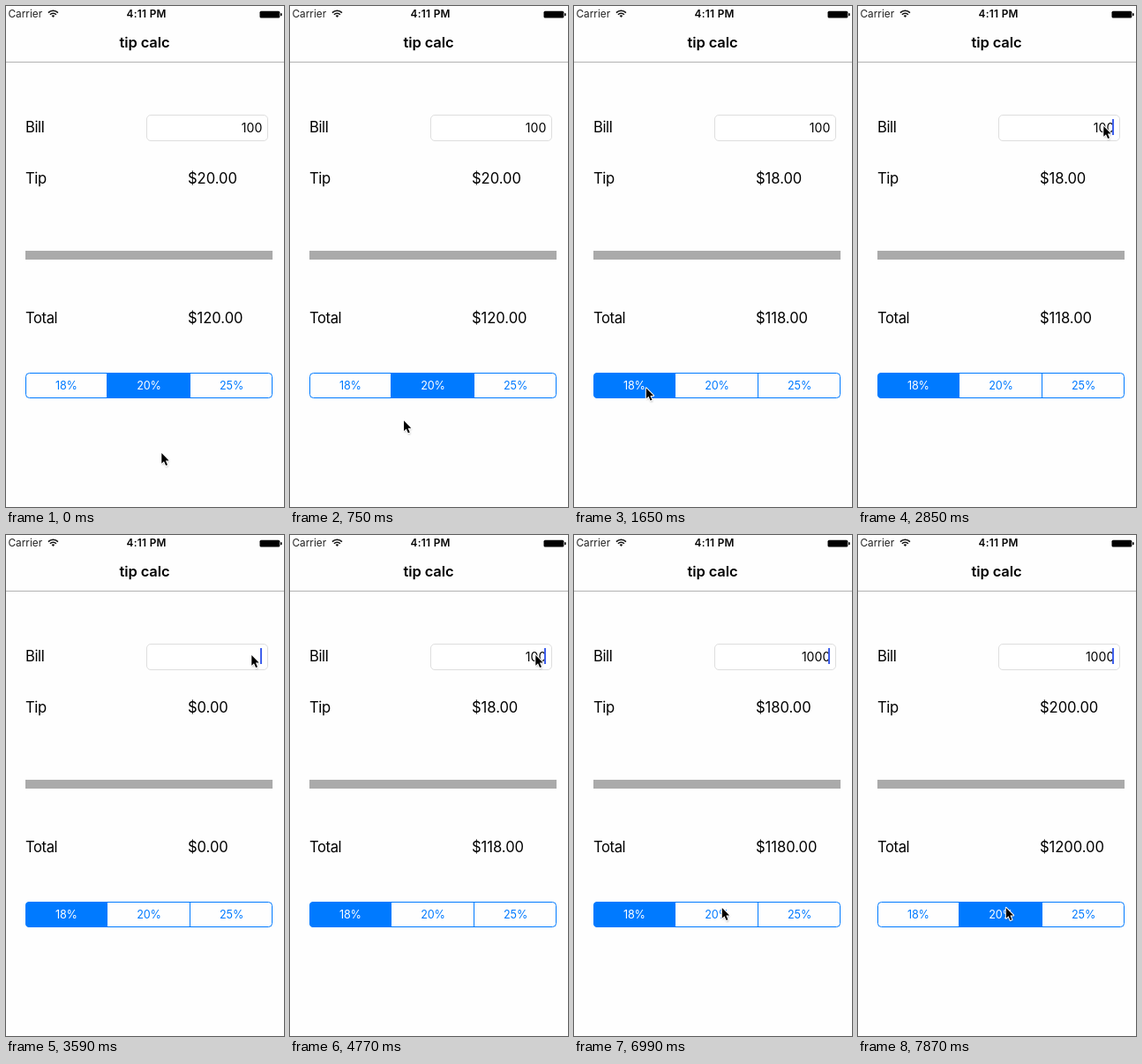
These frames come from a looping animation (315x567 px, 8000 ms). An HTML page:

```html
<!DOCTYPE html>
<html lang="en">
<head>
<meta charset="utf-8">
<title>tip calc</title>
<style>
  html, body { margin: 0; width: 100%; height: 100%; overflow: hidden; background: #fefefe; }
  svg { display: block; width: 315px; height: 567px; font-family: Inter, Roboto, sans-serif; }
  .label { font-size: 16.6px; letter-spacing: -.4px; }
  .amount { letter-spacing: -.05px; }
  .seg text { font-size: 12.6px; letter-spacing: -.15px; text-anchor: middle; fill: #007aff; }
  .seg rect { fill: transparent; }
  .seg.pressed rect { fill: #d9ebff; }
  .seg.on rect { fill: #007aff; }
  .seg.on text { fill: #fff; }
</style>
</head>
<body>
<svg viewBox="0 0 315 567">
  <defs>
    <clipPath id="round"><rect x="22" y="415" width="280" height="29" rx="4.5"/></clipPath>
    <filter id="soft" x="-50%" y="-50%" width="200%" height="200%"><feGaussianBlur stdDeviation=".9"/></filter>
    <path id="arrow" d="M.8 1.4V13.2L3.5 10.8L5.6 15.6L7.5 14.8L5.4 10H9.1Z"/>
  </defs>
  <rect width="315" height="567" fill="#fefefe"/>
  <rect y="63" width="315" height="1" fill="#b2b2b2"/>

  <text x="2.5" y="13.4" font-size="11.8" fill="#222">Carrier</text>
  <g fill="none" stroke="#111" stroke-width="1.6">
    <path d="M47.9 7.6a7.7 7.7 0 0 1 11 0M49.9 9.7a4.9 4.9 0 0 1 7 0"/>
    <path d="M51.6 11.1a2.5 2.5 0 0 1 3.6 0L53.4 13.1Z" fill="#111" stroke="none"/>
  </g>
  <text x="159.2" y="13.4" font-size="11.8" font-weight="600" letter-spacing=".3" text-anchor="middle">4:11 PM</text>
  <rect x="287.5" y="5.8" width="22.8" height="7.7" rx="1.5"/>
  <rect x="311" y="8" width="1.6" height="3.4" rx=".8"/>
  <text x="157" y="47" font-size="16.5" font-weight="600" letter-spacing="-.1" text-anchor="middle">tip calc</text>

  <g class="label">
    <text x="22" y="143.3">Bill</text>
    <text x="22" y="201.3">Tip</text>
    <text x="22" y="359.3">Total</text>
    <text class="amount" id="tip" x="206" y="201.3"></text>
    <text class="amount" id="total" x="206" y="359.3"></text>
  </g>
  <rect x="159.5" y="123.5" width="137" height="29" rx="4.5" fill="#fff" stroke="#dedede"/>
  <text id="bill" x="290.3" y="143" font-size="14.1" text-anchor="end"></text>
  <rect id="caret" x="288" y="128" width="2" height="18" fill="#4060ec"/>
  <rect x="22" y="277" width="280" height="10" fill="#aaa"/>

  <g clip-path="url(#round)">
    <g class="seg"><rect x="22" y="415" width="93" height="29"/><text x="68.4" y="434.2">18%</text></g>
    <g class="seg"><rect x="114" y="415" width="95" height="29"/><text x="162" y="434.2">20%</text></g>
    <g class="seg"><rect x="208" y="415" width="94" height="29"/><text x="255.6" y="434.2">25%</text></g>
  </g>
  <g fill="none" stroke="#007aff">
    <rect x="22.5" y="415.5" width="279" height="28" rx="4"/>
    <path d="M114.5 415V444M208.5 415V444"/>
  </g>

  <g id="cursor">
    <use href="#arrow" x=".6" y="1.6" opacity=".4" filter="url(#soft)"/>
    <use href="#arrow" stroke="#fff" stroke-width="2" stroke-linejoin="round"/>
    <use href="#arrow"/>
  </g>
</svg>
<script>
const LOOP = 8000;
const FOCUS = 1810;     // the field is clicked
const CARET_IN = 2400;  // the caret first shows
const $ = id => document.getElementById(id);
const segs = [...document.querySelectorAll(".seg")];
const rates = [18, 20, 25];

const home = { x: 175.5, y: 504.5 };
const moves = [
  { from: 150, to: 1350, x: 81, y: 431 },
  { from: 1650, to: 2400, x: 277.5, y: 134.5 },
  { from: 6250, to: 6980, x: 167, y: 420.5 },
];
const clicks = [{ at: 1650, seg: 0 }, { at: 7270, seg: 1 }];
const erase = { at: 3140, every: 220, count: 3 };
const type = { at: 4470, every: 147, count: 4 };

const clamp = (v, lo, hi) => Math.min(hi, Math.max(lo, v));
const ease = k => k * k * (3 - 2 * k);

const tick = t => t < 2850
  ? Math.floor(t / 150) * 150
  : 2850 + Math.floor((t - 2850) / 147.6) * 147.6;

function pointer(t) {
  let { x, y } = home;
  for (const m of moves) {
    const k = ease(clamp((t - m.from) / (m.to - m.from), 0, 1));
    x += (m.x - x) * k;
    y += (m.y - y) * k;
  }
  return [x, y];
}

const pressed = (t, run) => clamp(Math.floor((t - run.at) / run.every) + 1, 0, run.count);

const billAt = t => "1000".slice(0, 3 - pressed(t, erase) + pressed(t, type));

function lastKey(t) {
  const run = [type, erase].find(r => t >= r.at);
  return run ? run.at + (pressed(t, run) - 1) * run.every : FOCUS;
}

// Solid after a key press, then blinking.
function caretAlpha(t) {
  if (t < CARET_IN) return 0;
  const since = t - lastKey(t) - 580;
  const p = since % 950;
  if (since < 0 || p >= 430) return 1;
  return p < 130 ? .5 : 0;
}

function draw(time) {
  const t = tick(time);
  const bill = billAt(t);
  const pick = clicks.reduce((seg, c) => t >= c.at ? c.seg : seg, 1);
  const held = clicks.find(c => t >= c.at - 150 && t < c.at);
  const tip = bill * rates[pick] / 100;
  $("bill").textContent = bill;
  $("tip").textContent = "$" + tip.toFixed(2);
  $("total").textContent = "$" + (+bill + tip).toFixed(2);
  segs.forEach((s, i) => {
    s.classList.toggle("on", i === pick);
    s.classList.toggle("pressed", i === held?.seg);
  });
  $("caret").setAttribute("opacity", caretAlpha(t));
  $("cursor").setAttribute("transform", `translate(${pointer(t)})`);
}

const start = performance.now();
function loop() {
  draw((performance.now() - start) % LOOP);
  requestAnimationFrame(loop);
}
loop();
</script>
</body>
</html>
```
